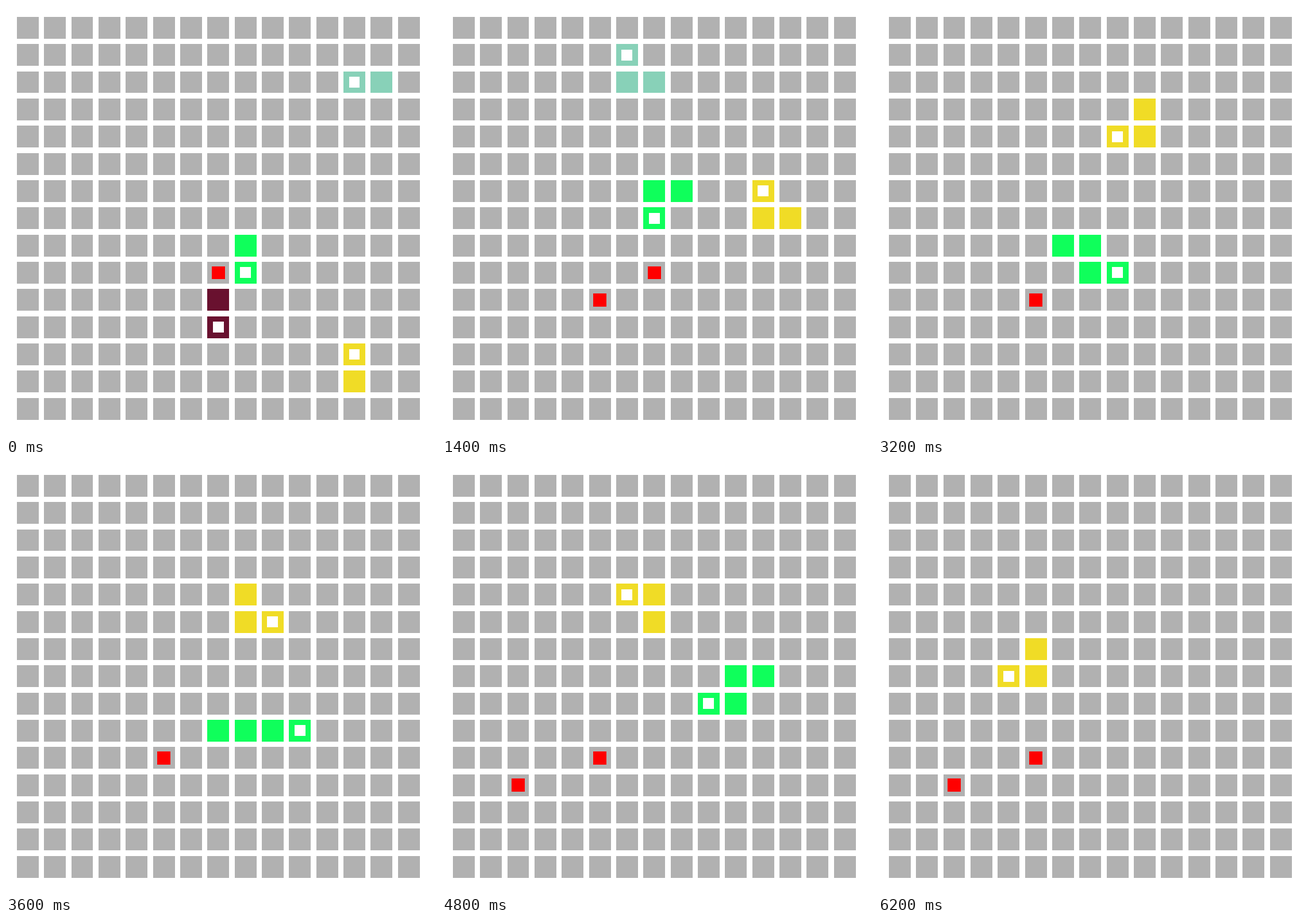
An HTML page with a canvas for the animation above (6400 ms loop, 748 by 748 pixels).

```html
<!DOCTYPE html>
<html lang="en">
<head>
<meta charset="utf-8">
<title>Snakes on a grid</title>
<style>
  html, body { margin: 0; width: 100%; height: 100%; overflow: hidden; background: #fff; }
  canvas { display: block; }
</style>
</head>
<body>
<canvas id="board" width="748" height="748"></canvas>
<script>
const ctx = document.getElementById("board").getContext("2d");
const CELLS = 15, UNIT = 748 / 79, STEP = 200, STEPS = 32;
const MOVES = { U: [0, -1], D: [0, 1], L: [-1, 0], R: [1, 0] };

// Each path begins one move before the loop; a snake is gone when it runs out.
const snakes = [
  { color: "#88d1b8", start: [13, 2], path: "LLLLLLLUL", meals: [] },
  { color: "#69112f", start: [7, 10], path: "DRUUUU", meals: [] },
  { color: "#0fff5b", start: [8, 8], path: "DRUUULLDLDLDRURDRRRRUULDLULULDL", meals: [15, 30] },
  { color: "#f0dc26", start: [12, 13], path: "UUUUUULULULURULDLDRULDLULULDDDDL", meals: [] }
];

const foods = [
  { at: [7, 9], from: 0, to: 15 },
  { at: [5, 10], from: 5, to: STEPS },
  { at: [2, 11], from: 20, to: STEPS },
  { at: [6, 7], from: 25, to: 30 }
];

for (const s of snakes) {
  s.trail = [s.start];
  for (const m of s.path) {
    const [x, y] = s.trail[s.trail.length - 1];
    s.trail.push([x + MOVES[m][0], y + MOVES[m][1]]);
  }
}

// Square inside a cell, with its edges on whole pixels.
function square([col, row], inset, color) {
  const edge = (i, d) => Math.round((2 + 5 * i + d) * UNIT);
  const x = edge(col, inset), y = edge(row, inset);
  ctx.fillStyle = color;
  ctx.fillRect(x, y, edge(col, 4 - inset) - x, edge(row, 4 - inset) - y);
}

function drawSnake(s, step) {
  const head = step + 1;
  if (head >= s.trail.length) return;
  const length = 3 + s.meals.filter(m => step >= m).length;
  for (const cell of s.trail.slice(Math.max(0, head - length + 1), head + 1)) {
    square(cell, 0, s.color);
  }
  square(s.trail[head], 1, "#fff");
}

function draw(step) {
  ctx.fillStyle = "#fff";
  ctx.fillRect(0, 0, 748, 748);
  for (let row = 0; row < CELLS; row++) {
    for (let col = 0; col < CELLS; col++) square([col, row], 0, "#b1b1b1");
  }
  for (const f of foods) {
    if (step >= f.from && step < f.to) square(f.at, 0.8, "#f00");
  }
  for (const s of snakes) drawSnake(s, step);
}

const begin = performance.now();
let shown = -1;
function tick() {
  const step = Math.floor((performance.now() - begin) / STEP) % STEPS;
  if (step !== shown) draw(shown = step);
  requestAnimationFrame(tick);
}
tick();
</script>
</body>
</html>
```
